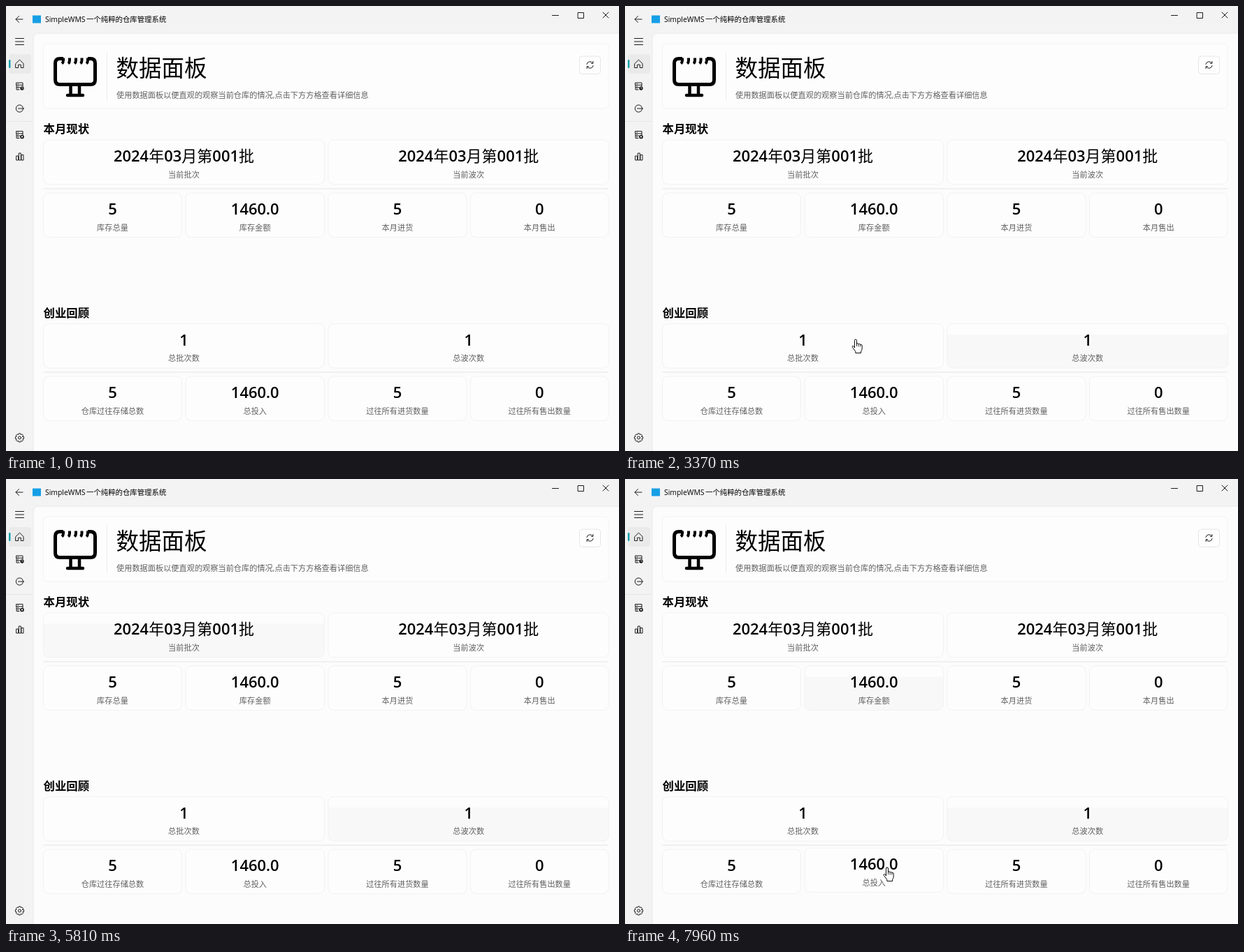
Write an HTML page that moves like this. It is 877x638 px and loops after 8 s.

```html
<!DOCTYPE html>
<html lang="zh-CN">
<head>
<meta charset="utf-8">
<title>SimpleWMS</title>
<style>
html, body { margin: 0; width: 100%; height: 100%; overflow: hidden; background: #f3f3f3; }
svg { display: block; width: 877px; height: 638px; overflow: hidden; }
text { font-family: "Open Sans", "Noto Sans CJK SC", "Noto Sans CJK", sans-serif; white-space: pre; }
.icon { fill: none; stroke: #1c1c1c; stroke-width: 1; stroke-linecap: round; stroke-linejoin: round; }
</style>
</head>
<body>
<svg id="stage" viewBox="0 0 877 638"></svg>
<script>
const LOOP = 8000;
const stage = document.getElementById('stage');

const text = (x, y, str, size, fill = '#000', anchor = 'start', weight = 400) =>
  `<text x="${x}" y="${y}" font-size="${size}" fill="${fill}" text-anchor="${anchor}" font-weight="${weight}">${str}</text>`;
const rect = (x, y, w, h, r, attrs) =>
  `<rect x="${x}" y="${y}" width="${w}" height="${h}" rx="${r}" ${attrs}/>`;
const icon = (x, y, d, extra = '') =>
  `<g transform="translate(${x} ${y})" class="icon"><path d="${d}"/>${extra}</g>`;

// Cards: left, width, top, value, label
const HALF = [[53.5, 402], [461, 401.5]];
const QUARTER = [[53.5, 198], [257, 198.5], [461, 198], [664.5, 197.5]];
const row = (slots, top, items) => slots.map(([x, w], i) => ({ x, w, y: top, h: 63.5, value: items[i][0], label: items[i][1] }));
const cards = [
  ...row(HALF, 192, [['2024年03月第001批', '当前批次'], ['2024年03月第001批', '当前波次']]),
  ...row(QUARTER, 268, [['5', '库存总量'], ['1460.0', '库存金额'], ['5', '本月进货'], ['0', '本月售出']]),
  ...row(HALF, 455.5, [['1', '总批次数'], ['1', '总波次数']]),
  ...row(QUARTER, 531, [['5', '仓库过往存储总数'], ['1460.0', '总投入'], ['5', '过往所有进货数量'], ['0', '过往所有售出数量']])
];

// Flyouts: the pressed card stays tinted until `end`
const flyouts = [
  { card: 7, press: 1600, open: 1650, close: 2890, end: LOOP, note: '显示过往的所有波次' },
  { card: 6, press: 3300, open: 3510, close: 4540, end: 4540, note: '显示过往的所有批次' },
  { card: 0, press: 4960, open: 5010, close: 5810, end: 5900, note: '显示当前批次的商品' },
  { card: 3, press: 6400, open: 6474, close: 7600, end: LOOP, note: '显示本月的商品金额' }
];
const FLY = { w: 473, h: 322, rise: 311, time: 187, slide: 8 };
for (const f of flyouts) {
  const c = cards[f.card];
  f.x = Math.round(c.x + c.w / 2 - FLY.w / 2);
  f.y = c.y - FLY.rise;
}

// Pointer stops: time, x, y
const stops = [
  [0, 500, 642], [180, 500, 642], [510, 590, 442], [740, 590, 442], [1160, 538, 522], [1450, 538, 522],
  [1640, 560, 506], [2100, 560, 506], [2800, 865, 172], [2950, 865, 172], [3330, 330, 478], [3510, 330, 478],
  [4220, 449, 174], [4540, 449, 174], [4730, 400, 218], [5050, 400, 218], [5420, 452, -25], [5820, 452, -25],
  [6330, 374, 275], [6555, 374, 275], [7090, 552, -25], [7600, 552, -25], [7930, 375, 557], [LOOP, 375, 557]
];

function chrome() {
  const gear = Array.from({ length: 8 }, (_, i) => {
    const a = i * Math.PI / 4, p = (r, d) => `${(r * Math.cos(a + d)).toFixed(2)} ${(r * Math.sin(a + d)).toFixed(2)}`;
    return `${i ? 'L' : 'M'}${p(4.7, -.39)}L${p(6.2, -.2)}L${p(6.2, .2)}L${p(4.7, .39)}`;
  }).join('') + 'Z';
  const stack = 'M-5 -5H4V-1.7H-5ZM-5 -1.7V1.6H0M-5 1.6V5H-1M-3 -3.4H-2.5M-3 0H-2.5M-3 3.3H-2.5M4 -1.7V0';
  return rect(0, 0, 877, 638, 0, 'fill="#f3f3f3"')
    + '<path d="M39 640V47Q39 39 47 39H880V640Z" fill="#fcfcfc" stroke="#e9e9e9"/>'
    + icon(19, 19, 'M5 0H-5M-.5 -4.5L-5 0L-.5 4.5')
    + rect(38, 13.5, 12, 11, 0, 'fill="#169fe6"')
    + text(56, 22.8, 'SimpleWMS', 10.4)
    + text(115, 22.8, '一个纯粹的仓库管理系统', 10.4)
    + icon(786, 13.5, 'M-4.5 0H4.5')
    + icon(822.5, 13.5, 'M-4 -4H4V4H-4Z')
    + icon(858, 13, 'M-4 -4L4 4M4 -4L-4 4')
    + icon(19.5, 51, 'M-6 -4.5H6M-6 0H6M-6 4.5H6')
    + rect(4, 69, 32, 28, 4, 'fill="#eaeaea"')
    + rect(4, 77, 2.4, 12, 1.2, 'fill="#009faa"')
    + icon(19.5, 83, 'M-5.5 -.5L0 -5.8L5.5 -.5V5.5H1.8V1.2H-1.8V5.5H-5.5Z')
    + icon(20, 115, stack, '<circle cx="3" cy="3" r="2.7" fill="#1c1c1c" stroke="none"/><path d="M3 1.8V3H4" stroke="#fff" stroke-width=".7"/>')
    + icon(19.5, 147, 'M4.4 -2.8A5.2 5.2 0 1 0 4.4 2.8M-2 0H6M3.6 -2.2L6 0L3.6 2.2')
    + '<path d="M0 165.5H38" stroke="#e4e4e4"/>'
    + icon(20, 184.5, stack, '<circle cx="3" cy="3" r="2" stroke-width="1.7"/>')
    + icon(20, 216, 'M-5 -1H-2.4V5H-5ZM-1.3 -5H1.3V5H-1.3ZM2.4 -2.5H5V5H2.4Z')
    + icon(19.5, 619, gear, '<circle r="2"/>');
}

function header() {
  const ticks = [82, 91, 100, 108.5, 117].map(x => `M${x} 74.5V78Q${x} 81 ${x - 2} 82.5`).join('');
  return rect(53.5, 54, 808.5, 93, 6, 'fill="#fdfdfd" stroke="#f3f3f3"')
    + `<g fill="none" stroke="#000" stroke-width="5" stroke-linejoin="round">
       <path d="M82 75.5H77Q70.5 75.5 70.5 82V106Q70.5 112.5 77 112.5H121Q127.5 112.5 127.5 106V82Q127.5 75.5 121 75.5H117"/>
       <path d="M92.5 113V128M105 113V128" stroke-width="4.5"/><path d="M88 128H110" stroke-linecap="round" stroke-width="4.5"/>
       <path d="${ticks}" stroke-width="4"/></g>`
    + '<path d="M144.5 66V136" stroke="#ececec"/>'
    + text(157.5, 101.3, '数据面板', 32.5)
    + text(158, 132.2, '使用数据面板以便直观的观察当前仓库的情况,点击下方方格查看详细信息', 11.2, '#606060')
    + rect(820.5, 72, 30, 25.5, 4, 'fill="#fefefe" stroke="#e6e6e6"')
    + icon(835.5, 84.5, 'M-4.6 -1A4.7 4.7 0 0 1 4 -2.5M4.6 1A4.7 4.7 0 0 1 -4 2.5M4.4 -5V-2.3H1.8M-4.4 5V2.3H-1.8')
    + text(53.5, 182.2, '本月现状', 16.4, '#000', 'start', 600)
    + text(53.5, 446.2, '创业回顾', 16.4, '#000', 'start', 600)
    + '<path d="M53.5 262H862M53.5 525H862" stroke="#ededed" stroke-width="1.6"/>';
}

function card({ x, y, w, h, value, label }) {
  const mid = x + w / 2;
  const big = value.replace(/[^\d.]/g, ch => `<tspan font-weight="500">${ch}</tspan>`);
  return '<g class="card">'
    + rect(x, y, w, h, 8, 'fill="#fdfdfd"')
    + rect(x, y, w, h, 8, 'class="tint" fill="#f8f8f8"')
    + rect(x, y, w, h, 8, 'fill="none" stroke="#f2f2f2"')
    + text(mid, y + 31, big, 22, '#000', 'middle', 600)
    + text(mid, y + 53.7, label, 11.2, '#606060', 'middle')
    + '</g>';
}

function flyout({ card: i, note }) {
  const grey = '#5f5f5f', line = '#e3e3e3';
  const heads = [['商品名称', 94], ['商品品牌', 174], ['商品金额', 321]];
  const cells = [['石榴木偶', 70], ['石榴', 150], ['1460.0', 230]];
  let s = rect(0, 0, FLY.w, FLY.h, 18, 'fill="#f8f8f8"')
    + `<path d="M10.5 300V14Q10.5 6 18 6H454Q461.5 6 461.5 14V300" fill="none" stroke="#efefef"/>`
    + text(28, 21, cards[i].label, 11.2, '#000', 'start', 600)
    + text(28, 40, note, 11.2, '#303030')
    + icon(440, 28, 'M-3.5 -3.5L3.5 3.5M3.5 -3.5L-3.5 3.5')
    + `<path d="M28 50.5H428M28 77.5H428M54.5 50.5V77M134.5 50.5V77M214.5 50.5V77" stroke="${line}"/>`;
  for (const [str, x] of heads) s += text(x, 68, str, 10.5, grey, 'middle');
  for (const [str, x] of cells) s += text(x, 97, str, 10.5, '#202020');
  for (let r = 0; r < 7; r++) s += text(36, 97 + 31.1 * r, r + 1, 10, grey, 'middle');
  s += rect(421, 61, 2.6, 79, 1.3, 'fill="#858585"');
  return `<g class="flyout">${s}</g>`;
}

const pointer = `<g id="arrow"><path d="M0 0V13.6L3.1 10.8L5.3 15.6L7.4 14.7L5.3 10H9.6Z" fill="#fff" stroke="#000" stroke-width=".9"/></g>
  <g id="hand"><path d="M-1.5 12V1.5Q-1.5 0 0 0Q1.5 0 1.5 1.5V7Q1.5 5.8 2.8 5.8Q4.2 5.8 4.2 7.2Q4.4 6.4 5.5 6.4Q6.8 6.5 6.8 7.9Q7.2 7.3 8 7.4Q9.2 7.6 9.2 9V13Q9.2 15.5 7.6 17V19.5H-.2V17.3L-4.6 11.4Q-5.4 10 -4.3 9.4Q-3.4 9 -2.6 10Z" fill="#fff" stroke="#000" stroke-width=".95" stroke-linejoin="round"/>
  <path d="M1.5 7V10M4.2 7.2V10.5M6.8 7.9V10.5" stroke="#000" stroke-width=".8"/></g>`;

stage.innerHTML = chrome() + header() + cards.map(card).join('') + flyouts.map(flyout).join('') + pointer;

const cardEls = [...stage.querySelectorAll('.card')];
const tints = [...stage.querySelectorAll('.tint')];
const flyEls = [...stage.querySelectorAll('.flyout')];
const arrow = document.getElementById('arrow');
const hand = document.getElementById('hand');
const show = (el, on) => { el.style.display = on ? '' : 'none'; };
const inside = (p, x, y, w, h) => p.x >= x && p.x <= x + w && p.y >= y && p.y <= y + h;

function pointerAt(t) {
  let i = 1;
  while (i < stops.length - 1 && t > stops[i][0]) i++;
  const [t0, x0, y0] = stops[i - 1], [t1, x1, y1] = stops[i];
  const p = Math.max(0, Math.min(1, (t - t0) / (t1 - t0)));
  const k = (1 - Math.cos(Math.PI * p)) / 2;
  return { x: x0 + (x1 - x0) * k, y: y0 + (y1 - y0) * k };
}

// Opening progress of a flyout, ease-out
function progress(f, t) {
  if (t < f.open || t >= f.close) return 0;
  const p = Math.min(1, (t - f.open) / FLY.time);
  return 1 - (1 - p) ** 2;
}

function hoveredCard(t) {
  const p = pointerAt(t);
  const covered = flyouts.some(f => t >= f.open && t < f.close &&
    inside(p, f.x, f.y, FLY.w, FLY.h + FLY.slide * (1 - progress(f, t))));
  return covered ? -1 : cards.findIndex(c => inside(p, c.x, c.y, c.w, c.h));
}

function draw(t) {
  const lift = cards.map(() => 0);
  for (let k = 0; k < 6; k++) {
    const at = t - k * 10, i = hoveredCard(at);
    const pressed = flyouts.some(f => f.card === i && at >= f.press && at < f.close);
    if (i >= 0 && !pressed) lift[i] += 2 / 6;
  }
  cardEls.forEach((el, i) => {
    el.setAttribute('transform', `translate(0 ${-lift[i]})`);
    const f = flyouts.find(f => f.card === i && t >= f.open && t < f.end);
    show(tints[i], f);
    tints[i].style.clipPath = f && t >= f.close ? 'inset(15.5px 0 0 0)' : 'none';
  });
  flyouts.forEach((f, i) => {
    const v = progress(f, t);
    show(flyEls[i], v > 0);
    flyEls[i].setAttribute('opacity', v);
    flyEls[i].setAttribute('transform', `translate(${f.x} ${f.y + FLY.slide * (1 - v)})`);
  });
  const p = pointerAt(t), onCard = hoveredCard(t) >= 0;
  show(hand, onCard);
  show(arrow, !onCard);
  (onCard ? hand : arrow).setAttribute('transform', `translate(${p.x} ${p.y})`);
}

const start = performance.now();
function tick() {
  draw((performance.now() - start) % LOOP);
  requestAnimationFrame(tick);
}
tick();
</script>
</body>
</html>
```
